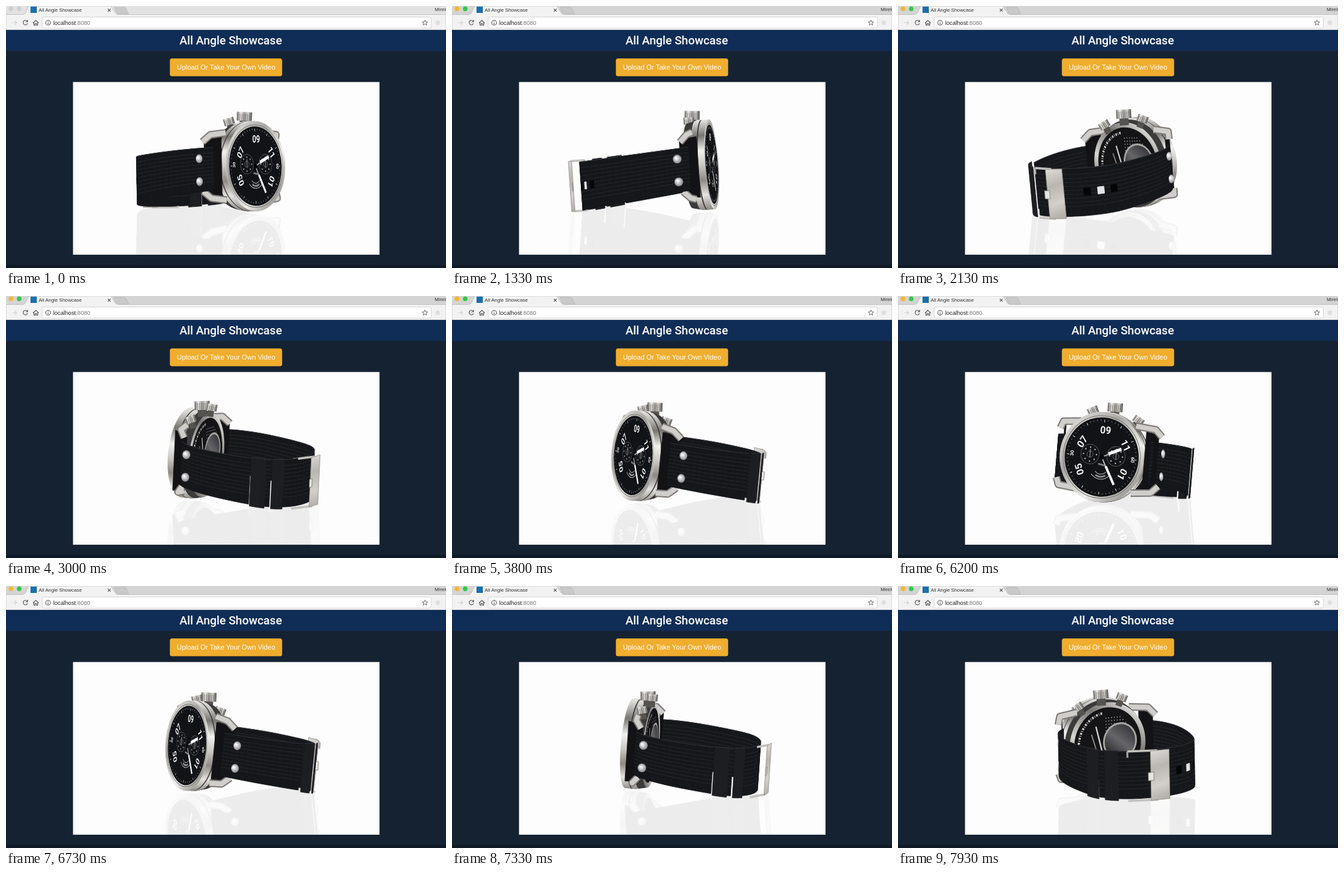
Animation, 700 px wide and 416 px high, one loop 8000 ms. Source, as an HTML page with a canvas:

```html
<!DOCTYPE html>
<html lang="en">
<head>
<meta charset="utf-8">
<title>All Angle Showcase</title>
<style>
  html, body { margin: 0; width: 100%; height: 100%; overflow: hidden; background: #152232; }
  #stage { position: relative; width: 700px; height: 416px; overflow: hidden; }
  #stage > * { position: absolute; display: block; }
  #page { left: 0; top: 0; }
  #photo { left: 107px; top: 121px; width: 487px; height: 274px; }
  text { font-family: "Liberation Sans", Arial, sans-serif; }
  .strip { fill: #d4d4d4; }
  .min { fill: #f6b62f; }
  .max { fill: #35c748; }
  .idle .strip { fill: #e2e2e2; }
  .idle .min, .idle .max { fill: #cfcfcf; }
  .icon { fill: none; stroke: #5c5c5c; stroke-width: 1.1; }
</style>
</head>
<body>
<div id="stage">
  <svg id="page" width="700" height="416" viewBox="0 0 700 416">
    <rect width="700" height="416" fill="#152232"/>
    <rect class="strip" width="700" height="14"/>
    <circle class="min" cx="8" cy="4.5" r="3.7"/>
    <circle class="max" cx="21" cy="4.5" r="3.7"/>
    <path d="M172 2H188Q190 2 191 4L195 13H179Q177 13 176 11Z" fill="#c9c9c9" stroke="#b3b3b3" stroke-width=".7"/>
    <path d="M0 13.5H27Q30 13 32 9L36 0H167L173 10Q175 13.5 179 13.5H700V38H0Z" fill="#f2f2f2" stroke="#b5b5b5" stroke-width=".7"/>
    <rect x="39" y="1" width="10" height="10" fill="#1a6fae"/>
    <text x="52" y="9" font-size="7.8" fill="#333">All Angle Showcase</text>
    <path d="M162 4.5l4.4 4.4m0-4.4l-4.4 4.4" class="icon"/>
    <text x="682" y="7.5" font-size="8" fill="#333">Mirelda</text>
    <path d="M10 26.5h7m-3-3l3 3l-3 3" class="icon" style="stroke:#d2d2d2"/>
    <path d="M34 24.5a3.6 3.6 0 1 0 .3 3M34.4 22v3h-3" class="icon"/>
    <path d="M43 27l4.5-4.2l4.5 4.2M44.5 26v4.5h2v-2.7h2v2.7h2V26" class="icon"/>
    <rect x="57.5" y="17.5" width="619" height="17.5" rx="2.5" fill="#fff" stroke="#d0d0d0" stroke-width=".8"/>
    <circle cx="67" cy="26.5" r="3.8" class="icon"/>
    <path d="M67 26v3M67 24v1" class="icon"/>
    <text x="75" y="29.7" font-size="9.15" fill="#222">localhost<tspan fill="#777">:8080</tspan></text>
    <path d="M666.5 22.2l1.2 2.9 3.1.2-2.4 2 .8 3-2.7-1.7-2.7 1.7.8-3-2.4-2 3.1-.2z" class="icon" style="stroke-width:.9"/>
    <circle cx="687" cy="26.5" r="3.5" fill="#dedede"/>
    <rect y="38" width="700" height="33" fill="#102d57"/>
    <rect y="71" width="700" height="1" fill="#13263f"/>
    <text x="357.5" y="61" text-anchor="middle" font-size="18.5" font-weight="500" fill="#fff" style="font-family:Roboto,sans-serif">All Angle Showcase</text>
    <rect x="260.7" y="83.2" width="178.600" height="28.200" rx="3.5" fill="#f0ad2e"/>
    <text x="350" y="101.3" text-anchor="middle" font-size="10.9" fill="#fff">Upload Or Take Your Own Video</text>
    <rect x="106.6" y="120.7" width="487.600" height="274.200" fill="#fdfdfd"/>
    <rect y="411" width="700" height="5" fill="#101a27"/>
  </svg>
  <canvas id="photo"></canvas>
</div>
<script>
const LOOP = 8000, STEP = 200 / 3;
const CENTER_X = 347, CENTER_Y = 256, TILT = .08, TABLE = 69, RADIUS = 71;
// The watch leans a little sideways and backwards on the table
const ROLL = .06, PITCH = .08;

// [time in ms, direction of the face in degrees, 0 = towards the viewer]
const TURNS = [[0, 48], [900, 48], [2130, 142], [2600, 218], [3000, 245], [3470, 299], [4200, 299],
  [4930, 362], [5500, 385], [6070, 350], [6730, 299], [7530, 245], [7667, 245], [7930, 206], [8000, 206]];

// Half of the strap loop seen from above: [across, towards the face]
const HALF = [[-72, 42], [-91, 22], [-102, -15], [-99, -65], [-84, -110], [-50, -134], [0, -143]];
const OUTLINE = [...HALF, ...HALF.slice(0, -1).reverse().map(([u, v]) => [-u, v])];
const KEEPERS = [29, 30, 32, 33], HOLES = [16, 18, 20];

const page = document.getElementById('page');
const photo = document.getElementById('photo');
const mirror = document.createElement('canvas');
const ratio = Math.max(1, devicePixelRatio || 1);
for (const c of [photo, mirror]) { c.width = 487 * ratio; c.height = 274 * ratio; }
const view = photo.getContext('2d'), mirrorView = mirror.getContext('2d');
let ctx, flip, cos, sin;

const depth = (u, v) => v * cos - u * sin;
function project(u, y, v) {
  const across = u - ROLL * y, front = v + PITCH * y, level = y + ROLL * u - PITCH * v;
  return [CENTER_X + across * cos + front * sin,
    CENTER_Y + TILT * depth(across, front) + TABLE + flip * (level - TABLE)];
}
// 0 at the case, 1 at the buckle
const backness = v => Math.min(1, Math.max(0, (40 - v) / 180));
const sag = v => 4 + 16 * backness(v);

function spline(points, parts) {
  const out = [], at = i => points[Math.min(points.length - 1, Math.max(0, i))];
  for (let i = 0; i < points.length - 1; i++)
    for (let j = 0; j < parts; j++) {
      const t = j / parts, [a, b, c, d] = [at(i - 1), at(i), at(i + 1), at(i + 2)];
      out.push([0, 1].map(k => b[k] + .5 * t * (c[k] - a[k]
        + t * (2 * a[k] - 5 * b[k] + 4 * c[k] - d[k] + t * (3 * (b[k] - c[k]) + d[k] - a[k])))));
    }
  return [...out, at(points.length - 1)];
}
const STRAP = spline(OUTLINE, 4);

function trace(points) {
  ctx.beginPath();
  points.forEach(p => ctx.lineTo(...project(...p)));
}
function polygon(points, fill, edge = fill) {
  trace(points);
  ctx.closePath();
  ctx.fillStyle = fill;
  ctx.strokeStyle = edge;
  ctx.lineWidth = .8;
  ctx.fill();
  ctx.stroke();
}
function wire(points, color, width) {
  trace(points);
  ctx.strokeStyle = color;
  ctx.lineWidth = width;
  ctx.stroke();
}
function disc(x, y, r, fill) {
  ctx.beginPath();
  ctx.arc(x, y, r, 0, 7);
  ctx.fillStyle = fill;
  ctx.fill();
}
function ring(x, y, r, color, width, from = 0, to = 7) {
  ctx.beginPath();
  ctx.arc(x, y, r, from, to);
  ctx.strokeStyle = color;
  ctx.lineWidth = width;
  ctx.stroke();
}
function line(x1, y1, x2, y2, color, width) {
  ctx.beginPath();
  ctx.moveTo(x1, y1);
  ctx.lineTo(x2, y2);
  ctx.strokeStyle = color;
  ctx.lineWidth = width;
  ctx.stroke();
}
function gradient(x1, y1, x2, y2, colors) {
  const g = ctx.createLinearGradient(x1, y1, x2, y2);
  colors.forEach((c, i) => g.addColorStop(i / (colors.length - 1), c));
  return g;
}

// Runs draw() in the flat coordinates of a plane parallel to the face
function onPlane(v, draw) {
  const [x0, y0] = project(0, 0, v), [x1, y1] = project(1, 0, v), [x2, y2] = project(0, 1, v);
  ctx.save();
  ctx.transform(x1 - x0, y1 - y0, x2 - x0, y2 - y0, x0, y0);
  draw();
  ctx.restore();
}
function label(text, x, y, size, angle) {
  ctx.save();
  ctx.translate(x, y);
  ctx.rotate(angle);
  ctx.font = `bold ${size}px Roboto, sans-serif`;
  ctx.textAlign = 'center';
  ctx.textBaseline = 'middle';
  ctx.fillStyle = '#f4f4f4';
  ctx.fillText(text, 0, 0);
  ctx.restore();
}

function drawDial() {
  disc(0, 0, RADIUS, gradient(-60, -60, 60, 60, ['#e5e3e0', '#aaa8a5', '#eeeeec', '#85837f']));
  ring(0, 0, 65, '#77746f', 1);
  disc(0, 0, 62.5, '#121316');
  for (let i = 0; i < 60; i++) {
    const a = i * Math.PI / 30, r = i % 5 ? 57 : 55;
    line(r * Math.cos(a), r * Math.sin(a), 59 * Math.cos(a), 59 * Math.sin(a), '#c9c9c9', i % 5 ? .6 : 1.2);
  }
  for (const x of [-20, 24]) {
    ring(x, -3, 15.5, '#55575b', 1);
    ring(x, -3, 5, '#77797d', .8);
    for (let i = 0; i < 8; i++) {
      const a = i * Math.PI / 4;
      disc(x + 11 * Math.cos(a), -3 + 11 * Math.sin(a), 1.3, '#a5a6a9');
    }
    line(x, -11, x, 2, '#ccc', .8);
  }
  label('09', 3, -42, 16, 0);
  label('07', -34, -21, 16, -1.05);
  label('05', -35, 22, 16, -1.95);
  label('11', 38, -21, 16, 1.05);
  label('01', 36, 24, 16, 2);
  label('60', 52, 0, 8, 1.57);
  label('30', -50, -2, 8, -1.57);
  ring(0, 15, 20, '#b9babd', 1, .7, 2.44);
  ring(0, 15, 12, '#b9babd', 1, .7, 2.44);
  ring(0, 15, 16, '#85878a', 3, 1, 2.1);
  line(-5, 11, 7, 13, '#777', 3);
  line(0, 0, 15, -7, '#aaa', 2);
  line(11, -6, 32, -15, '#fff', 5);
  line(0, 0, 10, 18, '#bbb', 2);
  line(8, 14, 24, 42, '#fff', 4);
  disc(0, 0, 4, '#050506');
}

function drawBack() {
  disc(0, 0, 67, gradient(-50, -60, 50, 60, ['#f0f0ee', '#777572', '#d6d4d0', '#55534f']));
  disc(0, 0, 59, '#141416');
  for (let y = -42; y < 10; y += 5)
    for (let x = -48; x < 5; x += 5)
      if (x * x + y * y < 2300) disc(x, y, 1, '#8b8c8e');
  ctx.setLineDash([3, 2, 1, 2]);
  ring(0, 0, 51, '#c4c4c4', 4, -1.4, 1);
  ctx.setLineDash([]);
  line(20, -30, 8, 18, '#d4d4d4', 2.5);
  line(28, -18, 17, 17, '#8a8a8a', 2);
  disc(-22, -3, 30, '#a9a7a3');
  disc(-22, -3, 27, gradient(-40, -30, 0, 20, ['#303034', '#66666a', '#202023']));
}

function drawCase() {
  const count = 18;
  for (let i = 0; i <= count; i++) {
    const k = cos >= 0 ? i : count - i;
    onPlane(32 + k * 34 / count, () => {
      const dark = k < 7 || k === 12;
      disc(0, 0, 67 + 4 * Math.min(1, k / 9), dark ? '#3c3b3b' : gradient(0, -70, 0, 70,
        ['#e2e1de', '#77756f', '#f1f1ef', '#c9c7c3', '#8d8a85', '#e5e3df', '#8d8a85']));
    });
  }
  onPlane(cos >= 0 ? 67 : 31, cos >= 0 ? drawDial : drawBack);
}

function drawKnob(u, y, width, height) {
  ctx.save();
  ctx.translate(...project(u, y, 40));
  ctx.scale(1, flip);
  ctx.rotate(Math.atan2(u * cos, -y));
  ctx.fillStyle = '#55534f';
  ctx.fillRect(-width * .3, 0, width * .6, height + 4);
  ctx.fillStyle = gradient(-width / 2, 0, width / 2, 0, ['#77746f', '#efeeec', '#a09d98', '#d6d4d0', '#4b4946']);
  ctx.fillRect(-width / 2, -height / 2, width, height);
  for (let x = -width / 2 + 2; x < width / 2; x += 3) line(x, -height / 2 + 3, x, height / 2, '#6b6864', .8);
  ctx.restore();
}

function drawStrapPart(i) {
  const keeper = KEEPERS.includes(i), grow = keeper ? 1.03 : 1;
  const [[u1, v1], [u2, v2]] = [STRAP[i], STRAP[i + 1]].map(p => p.map(n => n * grow));
  const half = v => 34 + 4 * backness(v) + (keeper ? 2 : 0);
  const level = f => [[u1, f * half(v1) + sag(v1), v1], [u2, f * half(v2) + sag(v2), v2]];
  const band = (a, b, fill) => polygon([...level(a), ...level(b).reverse()], fill);
  band(-1, 1, keeper ? '#1d1e22' : '#16171b');
  wire(level(-1), '#33343a', 1);
  if (!keeper) for (let f = -.75; f <= .75; f += .1667) wire(level(f), '#27282d', 1);
  if (HOLES.includes(i)) band(-.15, .15, i === HOLES[1] ? '#e4e4e6' : '#050506');
}

function drawScrew(u, y, v) {
  const [x, sy] = project(u, y + sag(v), v);
  const g = ctx.createRadialGradient(x - 2, sy - 2, 1, x, sy, 7);
  g.addColorStop(0, '#fafafa');
  g.addColorStop(1, '#85838a');
  ctx.beginPath();
  ctx.ellipse(x, sy, Math.max(3, 7 * Math.abs(sin)), 7, 0, 0, 7);
  ctx.fillStyle = g;
  ctx.fill();
}

function drawBuckle() {
  const v = -160, mid = sag(v);
  for (const y of [-40, 39]) wire([[5, mid + y, v], [50, mid + y, -144]], '#c4c2bf', 3.5);
  wire([[50, mid - 40, -144], [50, mid - 30, -144]], '#aaa8a5', 3);
  const [x, y] = project(0, mid, v);
  polygon([[-16, mid - 40, v], [17, mid - 40, v], [17, mid + 39, v], [-16, mid + 39, v]],
    gradient(x - 15, y - 40, x + 15, y + 40, ['#dddbd8', '#b9b6b2', '#d3d0cc', '#aaa7a2']), '#8e8b87');
  polygon([[12, mid - 6, v - 1], [22, mid - 6, v - 1], [22, mid + 7, v - 1], [12, mid + 7, v - 1]], '#e6e5e3', '#77746f');
}

function drawLugs(side) {
  polygon([[side * 68, -46, 56], [side * 80, -42, 30], [side * 80, 46, 30], [side * 68, 50, 56]], '#131316');
  for (const end of [-1, 1]) {
    const arm = [[side * 46, end * 53, 46], [side * 78, end * 50, 42], [side * 86, end * 39, 32]];
    wire(arm, '#7d7a76', 12);
    wire(arm, '#d0cecb', 8);
  }
}

function drawWatch() {
  const parts = [];
  const add = (u, v, draw, lift = 0) => parts.push([depth(u, v) + lift, draw]);
  for (let i = 0; i < STRAP.length - 1; i++)
    add(...STRAP[i], () => drawStrapPart(i), KEEPERS.includes(i) ? 2 : 0);
  add(0, 48, drawCase);
  add(0, 42, () => drawKnob(6, -79, 24, 14));
  add(0, 42, () => drawKnob(-31, -71, 17, 11));
  add(0, 42, () => drawKnob(47, -62, 17, 11));
  add(0, -172, drawBuckle);
  for (const side of [-1, 1]) {
    add(side * 72, 38, () => drawLugs(side));
    if (side * sin < 0) for (const y of [-18, 18])
      add(side * 88, 26, () => drawScrew(side * 88, y, 26), 14);
  }
  parts.sort((a, b) => a[0] - b[0]).forEach(([, draw]) => draw());
}

function begin(target, direction) {
  ctx = target;
  flip = direction;
  ctx.setTransform(ratio, 0, 0, ratio, 0, 0);
  ctx.clearRect(0, 0, 487, 274);
  ctx.translate(-107, -121);
  ctx.lineJoin = 'round';
}

function drawPhoto(degrees) {
  cos = Math.cos(degrees * Math.PI / 180);
  sin = Math.sin(degrees * Math.PI / 180);
  begin(mirrorView, -1);
  drawWatch();
  begin(view, 1);
  ctx.save();
  ctx.globalAlpha = .07;
  ctx.drawImage(mirror, 107, 121, 487, 274);
  ctx.restore();
  drawWatch();
}

function angleAt(time) {
  const i = TURNS.findIndex(([end]) => time < end);
  const [t1, a1] = TURNS[i - 1], [t2, a2] = TURNS[i];
  return a1 + (a2 - a1) * (time - t1) / (t2 - t1);
}

let shown = -1;
function tick(now) {
  const step = Math.floor((now % LOOP + 5) / STEP) % (LOOP / STEP);
  if (step !== shown) {
    shown = step;
    page.classList.toggle('idle', step === 0);
    drawPhoto(angleAt(step * STEP));
  }
  requestAnimationFrame(tick);
}
tick(0);
</script>
</body>
</html>
```
